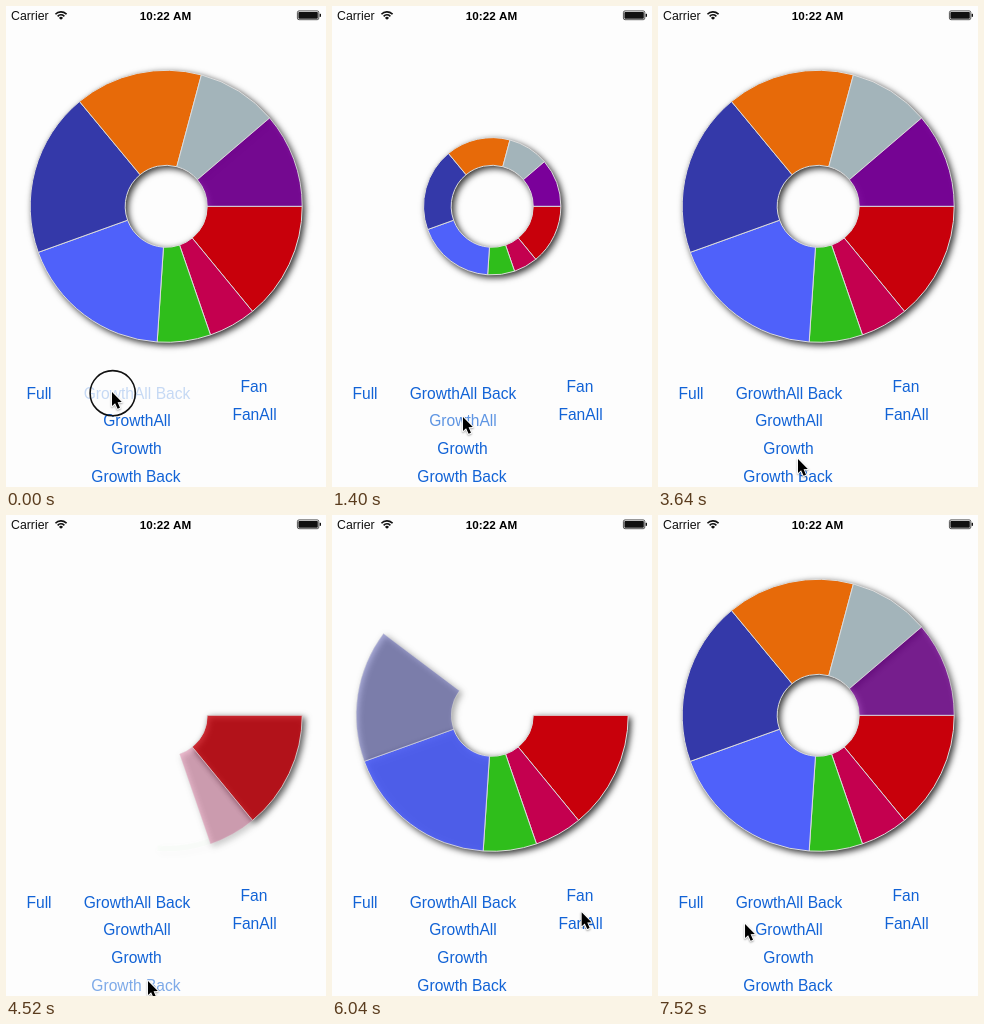
Recreate the animation shown at these times as an HTML page with a canvas. Size 320 px wide and 481 px high, loop 7.56 s.

```html
<!DOCTYPE html>
<html lang="en">
<head>
<meta charset="utf-8">
<title>Pie chart animations</title>
<style>
html, body { margin: 0; width: 100%; height: 100%; overflow: hidden; background: #fdfdfd; }
canvas { display: block; width: 320px; height: 481px; }
</style>
</head>
<body>
<canvas id="stage"></canvas>
<script>
const W = 320, H = 481, LOOP = 7560;
const CX = 160.2, CY = 200.3, INNER = 41, OUTER = 136;
const RUN = 1000, FADE = 250, TEXT_FADE = 500;
const FONT = '"Liberation Sans", Arial, sans-serif';

const dpr = window.devicePixelRatio || 1;
const stage = document.getElementById('stage');
const layer = document.createElement('canvas');
for (const c of [stage, layer]) {
  c.width = Math.round(W * dpr);
  c.height = Math.round(H * dpr);
}
const ctx = stage.getContext('2d');
const pie = layer.getContext('2d');
ctx.scale(dpr, dpr);
pie.scale(dpr, dpr);

// colour and end angle in degrees, clockwise from the right
let from = 0;
const slices = [
  ['#c8000b', 50.6], ['#c4004f', 71], ['#2fbe1b', 93.8], ['#4f61fa', 160.2],
  ['#3439a9', 230.4], ['#e76a09', 285], ['#a3b4ba', 319.5], ['#7a009a', 360]
].map(([color, to]) => {
  const slice = { color, from, to };
  from = to;
  return slice;
});

// label, centre x, baseline
const buttons = [
  ['Full', 33, 393], ['GrowthAll Back', 131, 393], ['GrowthAll', 131, 420],
  ['Growth', 130.5, 447.5], ['Growth Back', 130, 475.5],
  ['Fan', 248, 386], ['FanAll', 248.5, 414]
];

const actions = [
  { name: 'GrowthAll Back', start: 100, press: 130 },
  { name: 'GrowthAll', start: 1110, press: 150 },
  { name: 'Growth', start: 2520, press: 250 },
  { name: 'Growth Back', start: 4320, press: 150 },
  { name: 'Fan', start: 5440, press: 120 },
  { name: 'FanAll', start: 6453, press: 150 }
];

// time, x, y of the pointer tip
const path = [
  [0, 106, 386], [450, 106, 386], [900, 131, 411], [1600, 131, 411],
  [2200, 134, 445], [2800, 134, 445], [3640, 140, 453], [4050, 142, 466],
  [4600, 142, 466], [5200, 245, 431], [5320, 248, 384], [5800, 248, 384],
  [6250, 251, 408], [6900, 251, 408], [7520, 87, 409], [7560, 106, 386]
];

const mod = (a, n) => ((a % n) + n) % n;
const clamp = v => Math.max(0, Math.min(1, v));
const mix = (a, b, k) => a + (b - a) * k;
const rad = d => d * Math.PI / 180;

function pointer(t) {
  const i = Math.max(1, path.findIndex(p => p[0] >= t));
  const [t0, x0, y0] = path[i - 1], [t1, x1, y1] = path[i];
  let k = (t - t0) / (t1 - t0);
  k = k * k * (3 - 2 * k);
  return [mix(x0, x1, k), mix(y0, y1, k)];
}

function drawSlice(color, a, b, r0, r1, alpha) {
  if (b - a < 0.05 || r1 - r0 < 0.2 || alpha <= 0) return;
  pie.globalAlpha = alpha;
  pie.beginPath();
  pie.arc(CX, CY, r1, rad(a), rad(b));
  pie.arc(CX, CY, r0, rad(b), rad(a), true);
  pie.closePath();
  pie.fillStyle = color;
  pie.fill();
  pie.strokeStyle = '#dcdcdc';
  pie.lineWidth = 1;
  pie.stroke();
}

function drawPie(name, age) {
  pie.clearRect(0, 0, W, H);
  const all = name.startsWith('GrowthAll');
  const back = name.endsWith('Back');
  const fan = name.startsWith('Fan');
  slices.forEach((s, i) => {
    let begin = s.from / 360 * RUN, span = (s.to - s.from) / 360 * RUN;
    if (all) {
      begin = 0;
      span = RUN;
    } else if (name === 'Fan') {
      span = RUN / slices.length;
      begin = i * span;
    }
    const k = clamp((age - begin) / span);
    const alpha = clamp((age - begin) / FADE);
    const end = fan ? mix(s.from, s.to, k) : s.to;
    const r0 = back ? mix(OUTER, INNER, k) : INNER;
    const r1 = fan || back ? OUTER : mix(INNER, OUTER, k);
    drawSlice(s.color, s.from, end, r0, r1, alpha);
  });
  ctx.save();
  ctx.shadowColor = 'rgba(0,0,0,0.8)';
  ctx.shadowBlur = 6 * dpr;
  ctx.shadowOffsetX = ctx.shadowOffsetY = 2.5 * dpr;
  ctx.drawImage(layer, 0, 0, W, H);
  ctx.restore();
}

function text(str, x, y, font, color, align) {
  ctx.font = font + ' ' + FONT;
  ctx.fillStyle = color;
  ctx.textAlign = align;
  ctx.fillText(str, x, y);
}

function drawStatus() {
  text('Carrier', 5, 14, '12.3px', '#111', 'left');
  text('10:22 AM', 159.5, 13.5, 'bold 11.7px', '#000', 'center');
  ctx.strokeStyle = ctx.fillStyle = '#111';
  ctx.lineWidth = 1.6;
  for (const r of [4.6, 7.6]) {
    ctx.beginPath();
    ctx.arc(55, 13.5, r, rad(-137), rad(-43));
    ctx.stroke();
  }
  ctx.beginPath();
  ctx.moveTo(55, 13.8);
  ctx.arc(55, 13.8, 2.8, rad(-137), rad(-43));
  ctx.fill();
  ctx.lineWidth = 0.7;
  ctx.beginPath();
  ctx.roundRect(291.4, 4.9, 21.4, 8.8, 1.6);
  ctx.stroke();
  ctx.beginPath();
  ctx.roundRect(292.4, 5.9, 19.4, 6.8, 0.8);
  ctx.fill();
  ctx.fillRect(313.6, 7.8, 1.4, 3);
}

function buttonAlpha(name, t) {
  const act = actions.find(a => a.name === name);
  if (!act) return 1;
  const d = mod(t - act.start + act.press, LOOP) - act.press;
  return d < 0 ? 0.23 : mix(0.23, 1, clamp(d / TEXT_FADE));
}

function drawButtons(t) {
  for (const [label, x, y] of buttons) {
    ctx.globalAlpha = buttonAlpha(label, t);
    text(label, x, y, '15.6px', '#1263d6', 'center');
  }
  ctx.globalAlpha = 1;
}

function drawPointer(t) {
  const [x, y] = pointer(t);
  const pressed = actions.some(a => {
    const d = mod(t - a.start + a.press, LOOP);
    return d >= 30 && d < a.press;
  });
  if (pressed) {
    ctx.beginPath();
    ctx.arc(x + 0.7, y + 1.2, 22.6, 0, 2 * Math.PI);
    ctx.strokeStyle = '#111';
    ctx.lineWidth = 1.6;
    ctx.stroke();
  }
  ctx.save();
  ctx.translate(x, y);
  ctx.beginPath();
  [[0, 0], [0, 14], [3.1, 11.2], [5.6, 16.8], [8, 15.8], [5.6, 10.3], [9.8, 10]]
    .forEach(p => ctx.lineTo(...p));
  ctx.closePath();
  ctx.lineJoin = 'round';
  ctx.lineWidth = 1.8;
  ctx.strokeStyle = '#fff';
  ctx.shadowColor = 'rgba(0,0,0,0.35)';
  ctx.shadowBlur = 2 * dpr;
  ctx.shadowOffsetY = dpr;
  ctx.stroke();
  ctx.shadowColor = 'transparent';
  ctx.fillStyle = '#000';
  ctx.fill();
  ctx.restore();
}

function draw(t) {
  ctx.fillStyle = '#fdfdfd';
  ctx.fillRect(0, 0, W, H);
  const act = actions.findLast(a => a.start <= t) || actions[actions.length - 1];
  drawPie(act.name, mod(t - act.start, LOOP));
  drawStatus();
  drawButtons(t);
  drawPointer(t);
}

const origin = performance.now();
function tick() {
  draw(mod(performance.now() - origin, LOOP));
  requestAnimationFrame(tick);
}
tick();
</script>
</body>
</html>
```
